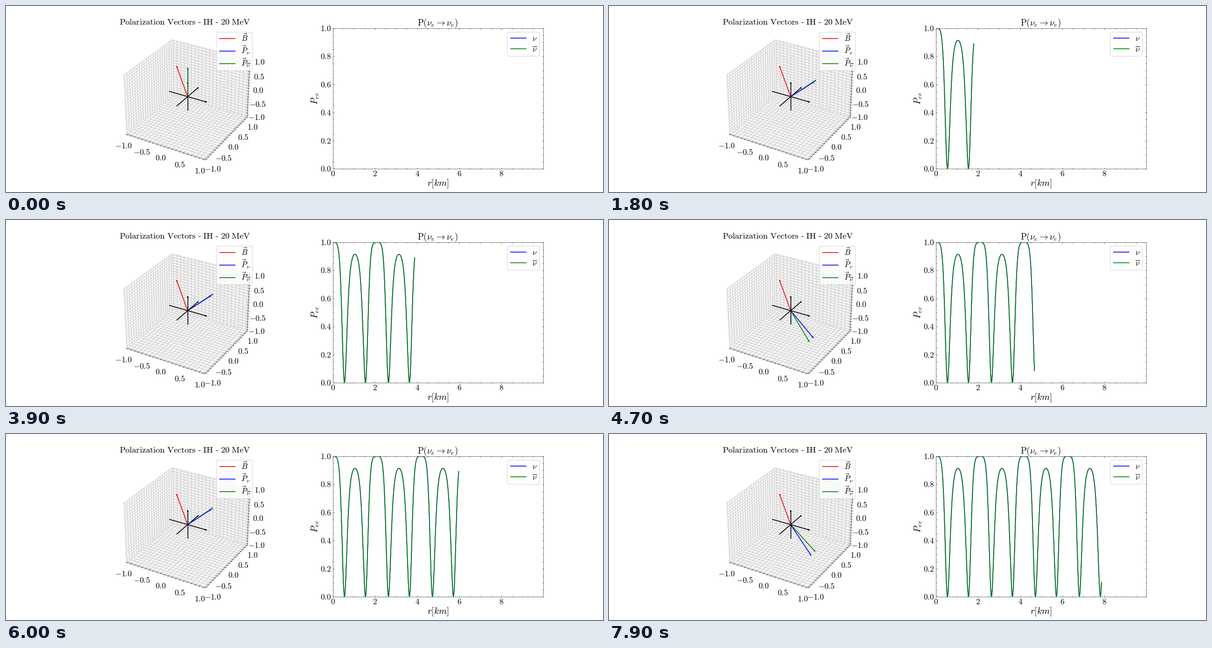
These frames come from a looping animation (1280x400 px, 8 s). A matplotlib script:

```python
import numpy as np
import matplotlib.pyplot as plt
from matplotlib.animation import FuncAnimation
from matplotlib.patches import FancyBboxPatch
from matplotlib.ticker import FuncFormatter, MultipleLocator

W, H, DPI = 1280, 400, 80
FRAMES, INTERVAL = 80, 100

plt.rcParams.update({
    "font.family": "Liberation Serif",
    "mathtext.fontset": "cm",
    "figure.subplot.bottom": 0.125,
    "axes.linewidth": 0.5,
    "grid.linewidth": 0.5,
    "lines.linewidth": 1.5,
})
for name in ("xtick", "ytick"):
    plt.rcParams.update({
        f"{name}.direction": "in",
        f"{name}.labelsize": 15.4,
        f"{name}.major.size": 3,
        f"{name}.minor.size": 1.5,
        f"{name}.major.width": 0.5,
        f"{name}.minor.width": 0.5,
    })

# Flavour pendulum: phi'' = kappa^2 sin(phi), phi measured from B
BETA = np.radians(17.0)
KAPPA = 6.3404
TILT = 0.05              # out-of-plane motion, omega / kappa
KM_PER_FRAME = 0.0995
SUB = 100                # integration steps per frame


def swing(count, dt):
    phi, rate = BETA, 0.0
    out = np.empty((count, 2))
    for i in range(count):
        out[i] = phi, rate
        rate += 0.5 * dt * KAPPA**2 * np.sin(phi)
        phi += dt * rate
        rate += 0.5 * dt * KAPPA**2 * np.sin(phi)
    return out.T


STEP = KM_PER_FRAME / SUB
phi, rate = swing(FRAMES * SUB + 1, STEP)
dist = np.arange(len(phi)) * STEP
py = TILT * rate / KAPPA
in_plane = np.sqrt(1 - py**2)
px = in_plane * np.sin(phi - BETA)
pz = in_plane * np.cos(phi - BETA)
survival = (1 + pz) / 2

fig = plt.figure(figsize=(W / DPI, H / DPI), dpi=DPI, facecolor="white")


def set_ticks(axis, major, minor, fmt):
    axis.set_major_locator(MultipleLocator(major))
    axis.set_minor_locator(MultipleLocator(minor))
    axis.set_major_formatter(FuncFormatter(lambda v, _: f"${v:{fmt}}$"))


# Vector view
space = fig.add_subplot(121, projection="3d")
edge = 25 / 24
space.set(xlim=(-edge, edge), ylim=(-edge, edge), zlim=(-edge, edge))
for axis in (space.xaxis, space.yaxis, space.zaxis):
    set_ticks(axis, 0.5, 0.1, ".1f")
space.tick_params(labelsize=15.4)


def arrow(start, vector, color):
    return space.quiver(*start, *vector, color=color, linewidth=1.5,
                        arrow_length_ratio=0.05)


for unit in np.eye(3):
    arrow(-unit / 2, unit, "black")
arrow((0, 0, 0), (-np.sin(BETA), 0, np.cos(BETA)), "red")

# Survival probability
plot = fig.add_subplot(122)
plot.set(xlim=(0, 9.99), ylim=(0, 1))
set_ticks(plot.xaxis, 2, 0.5, ".0f")
set_ticks(plot.yaxis, 0.2, 0.05, ".1f")
plot.tick_params(which="both", top=True, right=True)
curves = [plot.plot([], [], color=c)[0] for c in ("blue", "green")]

# Titles, labels and legends in pixel coordinates
page = fig.add_axes([0, 0, 1, 1], zorder=5)
page.set(xlim=(0, W), ylim=(H, 0))
page.axis("off")


def write(x, y, text, size, **kw):
    page.text(x, y, text, fontsize=size, **kw)


def legend(x0, x1, y1, entries):
    y0 = 56.3
    page.add_patch(FancyBboxPatch(
        (x0, y0), x1 - x0, y1 - y0, boxstyle="round,pad=0,rounding_size=3.3",
        facecolor=(1, 1, 1, 0.8), edgecolor=(0.8, 0.8, 0.8, 0.8), linewidth=1))
    for color, text, line_y, base in entries:
        page.plot([x0 + 6.7, x0 + 40], [line_y, line_y], color=color,
                  solid_capstyle="projecting")
        write(x0 + 53.2, base, text, 15, va="baseline")


write(384, 40.5, r"$\mathrm{Polarization\ Vectors\ }$-$\mathrm{\ IH\ }$-"
      r"$\mathrm{\ 20\ MeV}$", 16.5, ha="center", va="baseline")
write(925, 41.5, r"$\mathrm{P}(\nu_e \rightarrow \nu_e)$", 17,
      ha="center", va="baseline")
write(926.5, 382, r"$r[km]$", 17.7, ha="center", va="center")
write(663.5, 199, r"$P_{ee}$", 17.7, ha="center", va="center", rotation=90)
legend(451.2, 528.2, 139, [
    ("red", r"$\vec{B}$", 70, 76.5),
    ("blue", r"$\vec{P}_{\nu}$", 97, 102.5),
    ("green", r"$\vec{P}_{\overline{\nu}}$", 124, 129.5),
])
legend(1074.9, 1143.7, 108, [
    ("blue", r"$\nu$", 69, 75),
    ("green", r"$\overline{\nu}$", 92.4, 98),
])

moving = []


def update(frame):
    while moving:
        moving.pop().remove()
    i = frame * SUB
    for side, color in ((1, "blue"), (-1, "green")):
        moving.append(arrow((0, 0, 0), (px[i], side * py[i], pz[i]), color))
    for curve in curves:
        curve.set_data(dist[:i + 1:4], survival[:i + 1:4])
    return curves


anim = FuncAnimation(fig, update, frames=FRAMES, interval=INTERVAL,
                     init_func=lambda: curves, repeat=True, repeat_delay=0,
                     blit=False)
plt.show()
```
